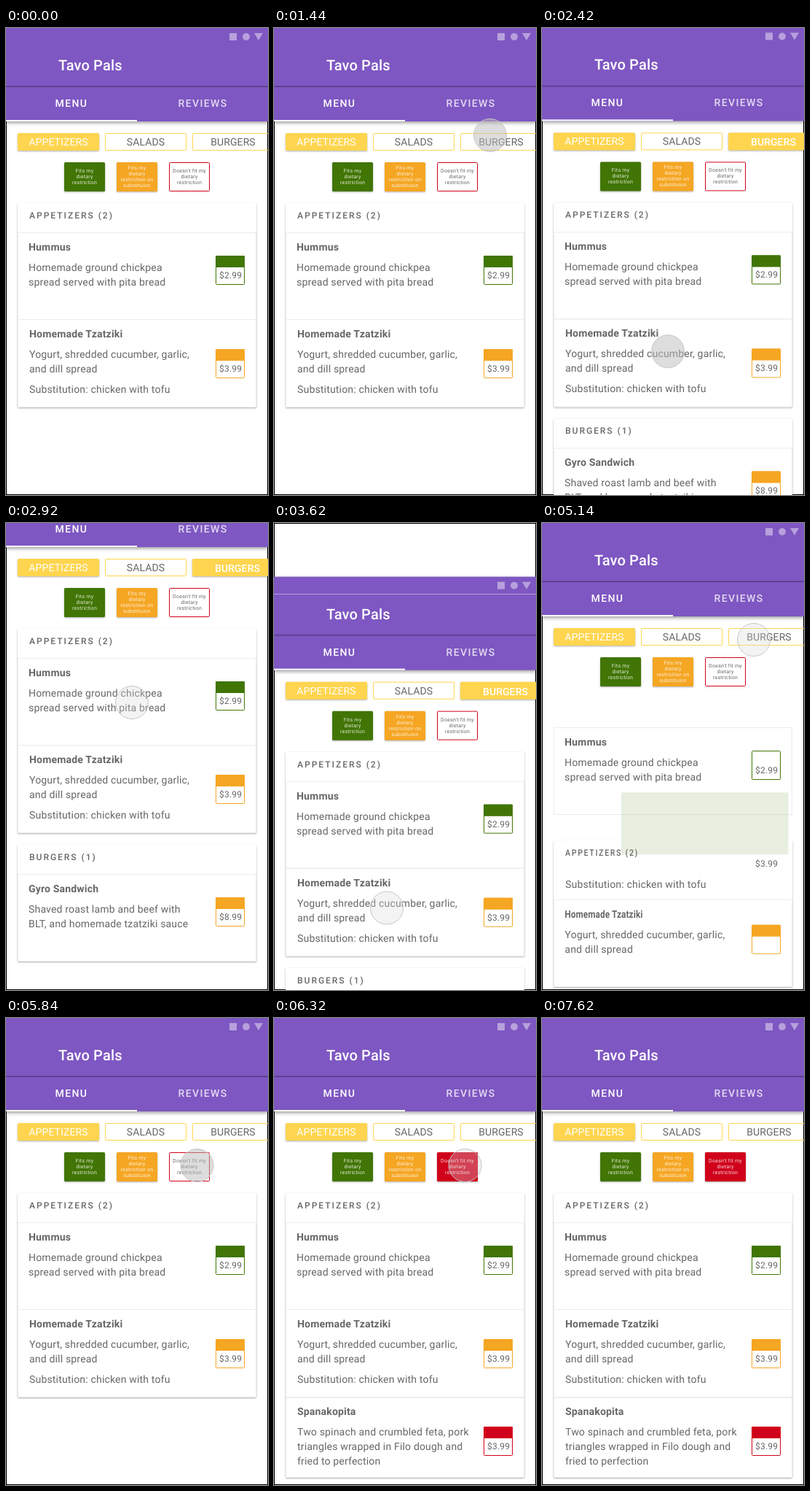
Recreate the animation shown at these times as an HTML page. Size 360 px wide and 640 px high, loop 8160 ms.

```html
<!DOCTYPE html>
<html lang="en">
<head>
<meta charset="utf-8">
<title>Menu filter</title>
<style>
  html, body { margin: 0; width: 100%; height: 100%; overflow: hidden; background: #fff; }
  svg { display: block; width: 360px; height: 640px; font-family: Roboto, Arial, sans-serif; }
  text { fill: #666; white-space: pre; text-rendering: geometricPrecision; }
  .bar { font-size: 20px; font-weight: 500; letter-spacing: .15px; fill: #fff; }
  .tab { font-size: 14px; font-weight: 500; letter-spacing: 1.4px; fill: #fff; }
  .dim { fill-opacity: .78; }
  .btn { font-size: 14px; letter-spacing: .1px; text-anchor: middle; }
  .chip { font-size: 7px; letter-spacing: .25px; text-anchor: middle; }
  .head { font-size: 12px; font-weight: 500; letter-spacing: 2px; }
  .name { font-size: 14px; font-weight: 700; letter-spacing: .18px; }
  .body { font-size: 14px; letter-spacing: .18px; }
  .price { font-size: 12px; letter-spacing: .2px; }
  .on { fill: #fff; }
  .chip.on { fill-opacity: .85; }
  .heavy { font-weight: 500; }
  .lift { filter: drop-shadow(0 1px 1px rgba(0, 0, 0, .32)); }
  .line { fill: none; stroke: #ececec; }
</style>
</head>
<body>
<script>
const NS = 'http://www.w3.org/2000/svg';
const LOOP = 8160, MORPH = 300;
const OPEN = 1540, CLOSE = 5075, RED_ON = 5880;
const PURPLE = '#7e57c2', YELLOW = '#ffd54f', GREEN = '#417505', ORANGE = '#f5a623', RED = '#d0021b';

function set(node, attrs) {
  for (const k in attrs) node.setAttribute(k, attrs[k]);
  return node;
}
function add(parent, tag, attrs) {
  return parent.appendChild(set(document.createElementNS(NS, tag), attrs));
}
const group = parent => add(parent, 'g', {});
const show = (node, yes) => set(node, { visibility: yes ? 'visible' : 'hidden' });
const rect = (parent, x, y, width, height, attrs) =>
  add(parent, 'rect', { x, y, width, height, ...attrs });
function text(parent, str, x, y, cls) {
  const node = add(parent, 'text', { class: cls });
  node.textContent = str;
  place(node, x, y);
  return node;
}
function place(node, x, y, sx = 1) {
  set(node, { transform: `translate(${x} ${y}) scale(${sx} 1)` });
}
function lines(parent, rows, x, y, step, cls) {
  const g = group(parent);
  rows.forEach((row, i) => text(g, row, x, y + i * step, cls));
  return g;
}
function solid(parent, x, y, w, h, fill) {
  return rect(parent, x, y, w, h, { rx: 1.5, fill, class: 'lift' });
}
function hollow(parent, x, y, w, h, stroke) {
  return rect(parent, x + .5, y + .5, w - 1, h - 1, { rx: 1, fill: 'none', stroke });
}
function tag(parent, y, color, filled) {
  const g = group(parent);
  hollow(g, 288, y, 40, 40, color);
  if (filled) rect(g, 288, y, 40, 16, { rx: 1, fill: color });
  return g;
}

// Stage
const svg = add(document.body, 'svg', { viewBox: '0 0 360 640' });
rect(svg, .5, .5, 359, 639, { fill: '#fff', stroke: '#000' });
const page = group(svg);

// App bar and tabs
rect(page, 0, 0, 360, 128, {
  fill: PURPLE, style: 'filter:drop-shadow(0 2px 2.5px rgba(0,0,0,.4))'
});
rect(page, 0, 80, 360, 1, { fill: '#000', opacity: .35 });
rect(page, 0, 79, 360, 1, { fill: '#000', opacity: .15 });
const seam = rect(page, 0, 23.3, 360, 1, { fill: '#fff', opacity: .45 });
rect(page, 307, 7, 10, 10, { fill: '#fff', opacity: .44 });
add(page, 'circle', { cx: 330, cy: 12, r: 5, fill: '#fff', opacity: .44 });
add(page, 'path', { d: 'M341 7h12l-6 10z', fill: '#fff', opacity: .44 });
text(page, 'Tavo Pals', 72, 58, 'bar');
text(page, 'MENU', 67.5, 108, 'tab');
text(page, 'REVIEWS', 236.5, 108, 'tab dim');
rect(page, 0, 126, 180, 2, { fill: '#fff' });

// Category buttons
solid(page, 16, 144, 112, 24, YELLOW);
text(page, 'APPETIZERS', 72, 161, 'btn on');
hollow(page, 136, 144, 112, 24, YELLOW);
text(page, 'SALADS', 192, 161, 'btn');
const burgerOff = group(page), burgerOn = group(page);
hollow(burgerOff, 256, 144, 112, 24, YELLOW);
text(burgerOff, 'BURGERS', 312, 161, 'btn');
solid(burgerOn, 256, 144, 124, 24, YELLOW);
text(burgerOn, 'BURGERS', 318, 162, 'btn on heavy');

// Diet chips
const noFit = ["Doesn't fit my", 'dietary', 'restriction'];
solid(page, 80, 184, 56, 40, GREEN);
lines(page, ['Fits my', 'dietary', 'restriction'], 108, 198, 8, 'chip on');
solid(page, 152, 184, 56, 40, ORANGE);
lines(page, ['Fits my', 'dietary', 'restriction on', 'substituion'], 180, 194, 8, 'chip on');
const redOff = group(page), redOn = group(page);
hollow(redOff, 224, 184, 56, 40, RED);
lines(redOff, noFit, 252, 198, 8, 'chip');
solid(redOn, 224, 184, 56, 40, RED);
lines(redOn, noFit, 252, 198, 8, 'chip on');

// Appetizers card
const app = group(page);
const appCard = solid(app, 16, 240, 328, 280, '#fff');
rect(app, 16.5, 280.5, 327, 119, { class: 'line' });
const tzBox = rect(app, 16.5, 400, 327, 120, { class: 'line' });
const greenBar = rect(app, 288, 312, 40, 16, { rx: 1, fill: GREEN });
const appHead = text(app, 'APPETIZERS (2)', 32, 261, 'head');
text(app, 'Hummus', 31, 305, 'name');
lines(app, ['Homemade ground chickpea', 'spread served with pita bread'], 31, 333, 20, 'body');
tag(app, 312, GREEN);
text(app, '$2.99', 293, 343, 'price');
const tzName = text(app, 'Homemade Tzatziki', 32, 424, 'name');
const tzBody = lines(app, ['Yogurt, shredded cucumber, garlic,', 'and dill spread'], 32, 452, 20, 'body');
text(app, 'Substitution: chicken with tofu', 32, 500, 'body');
const tzTag = tag(app, 440, ORANGE, true);
text(app, '$3.99', 293, 471, 'price');

const spana = group(app);
rect(spana, 16.5, 520.5, 327, 109, { class: 'line' });
text(spana, 'Spanakopita', 32, 544, 'name');
lines(spana, ['Two spinach and crumbled feta, pork', 'triangles wrapped in Filo dough and',
  'fried to perfection'], 32, 572, 20, 'body');
tag(spana, 560, RED, true);
text(spana, '$3.99', 293, 591, 'price');

// Burgers card
const bur = group(page);
const ghost = rect(bur, 288, 312, 40, 16, { fill: GREEN });
const burCard = solid(bur, 16, 536, 328, 160, '#fff');
const burBox = rect(bur, 16.5, 577, 327, 119, { class: 'line' });
const burHead = text(bur, 'BURGERS (1)', 32, 557, 'head');
const burName = text(bur, 'Gyro Sandwich', 31, 601, 'name');
const burBody = lines(bur, ['Shaved roast lamb and beef with', 'BLT, and homemade tzatziki sauce'], 31, 629, 20, 'body');
const burTag = tag(bur, 608, ORANGE, true);
text(bur, '$8.99', 293, 639, 'price');

const touch = add(svg, 'circle', { r: 22.5, stroke: '#c6c6c6' });

// Motion: [time, value...]
const path = [
  [540, 307, -24], [900, 286, 70], [1320, 297, 147], [1580, 297, 147], [2220, 173, 445],
  [2400, 173, 445], [2760, 173, 252], [2920, 173, 246], [3160, 170, 246], [3320, 170, 246],
  [3590, 155, 527.5], [4120, 155, 527.5], [4880, 291, 160], [5240, 291, 160], [5760, 262.5, 202],
  [6540, 262.5, 202], [6840, 202, 427], [7120, 336, 220], [7340, 311, 54], [7620, 385, -2]
];
const scroll = [
  [2400, 0], [2860, -95], [3330, -95], [3560, 90], [3620, 73.9],
  [3800, 28], [4000, 8], [4300, 0]
];
const presses = [[1420, 1540], [2260, 2700], [3320, 3550], [4960, 5080], [5780, 5880]];

// Smooth curve through the keys, never overshooting one
function track(keys, t, c = 1) {
  const last = keys.length - 1;
  if (t <= keys[0][0]) return keys[0][c];
  if (t >= keys[last][0]) return keys[last][c];
  let i = 0;
  while (t >= keys[i + 1][0]) i++;
  const slope = j => (keys[j + 1][c] - keys[j][c]) / (keys[j + 1][0] - keys[j][0]);
  const tangent = j => {
    if (j < 1 || j >= last) return 0;
    const a = slope(j - 1), b = slope(j);
    return a * b <= 0 ? 0 : 2 * a * b / (a + b);
  };
  const h = keys[i + 1][0] - keys[i][0], u = (t - keys[i][0]) / h, v = 1 - u;
  return v * v * (1 + 2 * u) * keys[i][c] + u * u * (1 + 2 * v) * keys[i + 1][c]
    + h * u * v * (v * tangent(i) - u * tangent(i + 1));
}

// cubic-bezier(.25, .1, .25, 1)
function ease(x) {
  if (x <= 0) return 0;
  if (x >= 1) return 1;
  const curve = (s, a, b) => 3 * (1 - s) * (1 - s) * s * a + 3 * (1 - s) * s * s * b + s * s * s;
  let lo = 0, hi = 1;
  for (let i = 0; i < 24; i++) {
    const mid = (lo + hi) / 2;
    if (curve(mid, .25, .25) < x) lo = mid; else hi = mid;
  }
  return curve(lo, .1, 1);
}

// The green bar spreads to the lower item's box as q goes to 1
function spread(node, q) {
  set(node, {
    x: 288 - 272 * q, y: 312 + 87 * q, width: 40 + 288 * q, height: 16 + 105 * q,
    'fill-opacity': (1 - q) ** 2
  });
}

function drawAppetizers(q, grow) {
  set(appCard, { y: 240 + 296 * q, height: 280 - 120 * q + 110 * grow });
  set(tzBox, { y: 400 + 177 * q - .5, height: 120 - q });
  place(appHead, 32, 261 + 296 * q, 1 - .195 * q);
  place(tzName, 32 - q, 424 + 177 * q, 1 - .25 * q);
  place(tzBody, -q, 177 * q);
  place(tzTag, 0, 168 * q);
  spread(greenBar, q);
}

function drawBurgers(r) {
  set(burCard, { y: 536 - 296 * r, height: 160 + 120 * r });
  set(burBox, { y: 577 - 177 * r - .5, height: 119 + r });
  place(burHead, 32, 557 - 296 * r, 1 + .24 * r);
  place(burName, 31 + r, 601 - 177 * r, 1 + .33 * r);
  place(burBody, r, -177 * r);
  place(burTag, 0, -168 * r);
  spread(ghost, 1 - r);
}

function draw(t) {
  const open = t >= OPEN && t < CLOSE, red = t >= RED_ON;
  const y = track(scroll, t);
  place(page, 0, y);
  show(seam, y > .5);
  show(burgerOn, open);
  show(burgerOff, !open);
  show(bur, open);
  show(redOn, red);
  show(redOff, !red);
  show(spana, red);
  drawAppetizers(t >= CLOSE ? 1 - ease((t - CLOSE) / MORPH) : 0, ease((t - RED_ON) / MORPH));
  drawBurgers(1 - ease((t - OPEN) / MORPH));

  const down = presses.some(([a, b]) => t >= a && t <= b);
  set(touch, {
    cx: track(path, t, 1), cy: track(path, t, 2),
    fill: down ? '#bbb' : '#d8d8d8', 'fill-opacity': down ? .5 : .3
  });
  show(touch, t >= 540 && t < 7620);
}

const start = performance.now();
function tick() {
  draw((performance.now() - start) % LOOP);
  requestAnimationFrame(tick);
}
tick();
</script>
</body>
</html>
```
